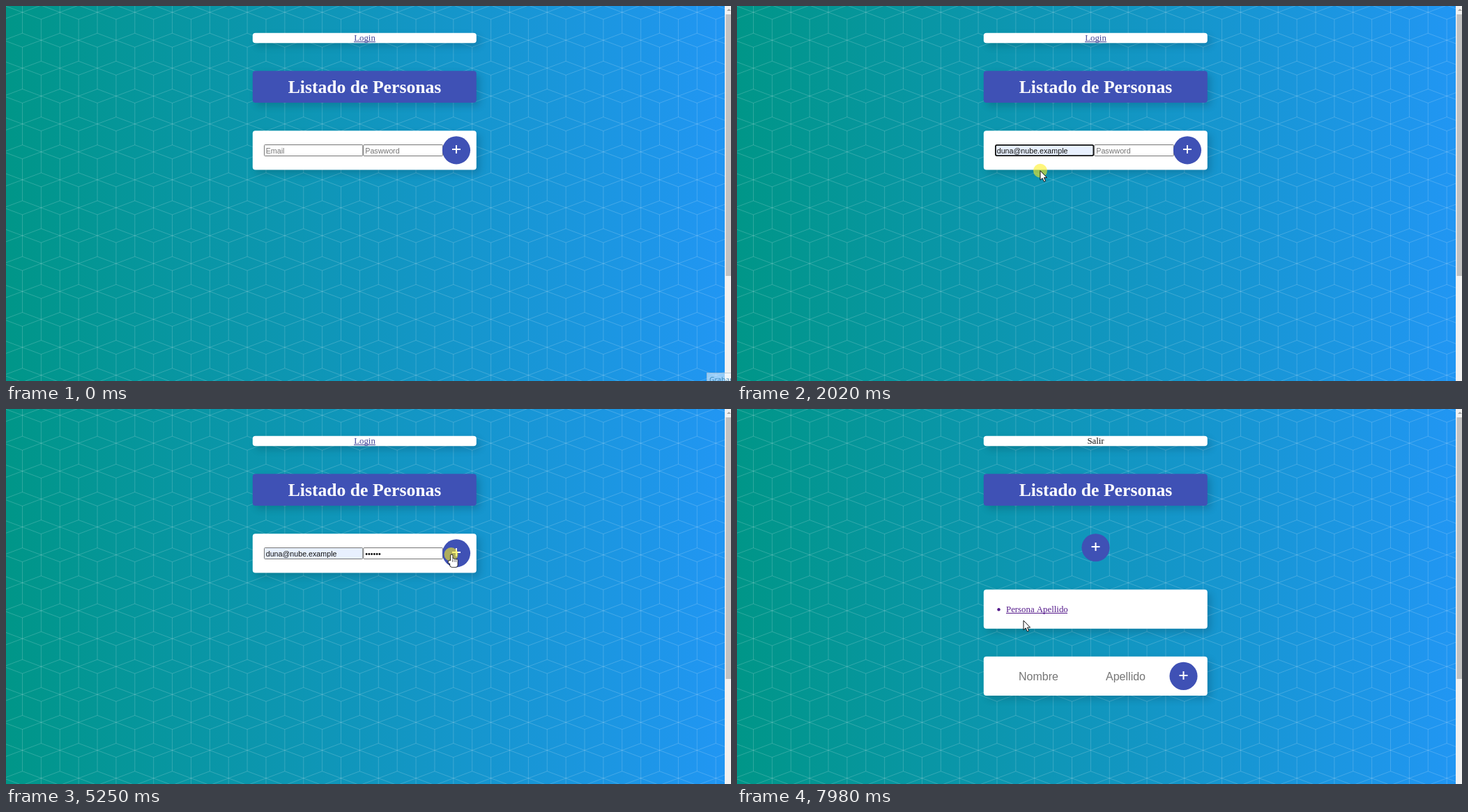
An HTML page with a canvas that plays this animation: 1040 by 539 pixels, repeating every 8000 ms.

```html
<!DOCTYPE html>
<html lang="es">
<head>
<meta charset="utf-8">
<title>Listado de Personas</title>
<style>
html, body { margin: 0; width: 100%; height: 100%; overflow: hidden; }
canvas { display: block; }
</style>
</head>
<body>
<canvas id="stage" width="1040" height="539"></canvas>
<script>
const W = 1040, H = 539, LOOP = 8000, PAGE_W = 1031;
const S = 0.8025; // page zoom
const INDIGO = '#3f51b5', GREY = '#757575', VISITED = '#551a8b', INK = '#111';
const SANS = '"Liberation Sans", Arial, sans-serif';
const SERIF = '"Liberation Serif", "Times New Roman", serif';
const UI = '"Open Sans", "Noto Sans", sans-serif';
const EMAIL = 'duna@nube.example';

// Moments in ms
const T = {
  focusEmail: 760, menu: 890, hover: 1420, pick: 1890, menuGone: 1960,
  focusPass: 2350, submit: 5250, home: 5600, openAdd: 7360, addForm: 7500
};
const CLICKS = [T.focusEmail, T.pick, T.focusPass, T.submit, T.openAdd];
const CLICK_MS = 160;

// Column layout: blocks separated by an equal gap
const GAP = 50 * S, LEFT = 353.8, MID = 514.5, ROUND = 25 * S;
const BAR = { y: 38.8, h: 18 * S };
const TITLE = below(BAR, 57 * S);
const FORM = below(TITLE, 70 * S);
const OPENER = below(TITLE, 2 * ROUND);
const LIST = below(OPENER, 70 * S);
const ADD = below(LIST, 70 * S);

const EMAIL_BOX = { x: 370, y: 199, w: 142.3, h: 17 };
const PASS_BOX = { x: 512.3, y: 199, w: 114.7, h: 17 };
const LINK_BOX = { x: 386, y: LIST.y + 21, w: 88, h: 13 };
const SUBMIT = { x: 646, y: middle(FORM) }, OPEN = { x: MID, y: middle(OPENER) };

// Pointer stops: when it leaves, and where it rests
const STOPS = [
  [70, 1036, 536], [1290, 433, 213], [2000, 434, 237], [2560, 533, 207],
  [4800, 535, 258.5], [5740, 638.5, 209], [6380, 472, 245], [7520, 510, 201],
  [LOOP, 411, 304]
];

const ARROW = new Path2D('M0 0V13.5L3.2 10.8 5.4 15.8 7.6 14.8 5.5 10H9.6Z');

const g = document.getElementById('stage').getContext('2d');

function below(block, h) {
  return { y: block.y + block.h + GAP, h };
}

function middle(block) {
  return block.y + block.h / 2;
}

function text(str, x, y, font, color, align = 'left') {
  g.font = font;
  g.fillStyle = color;
  g.textAlign = align;
  g.fillText(str, x, y);
}

function rect(x, y, w, h, color) {
  g.fillStyle = color;
  g.fillRect(x, y, w, h);
}

function roundRect(x, y, w, h, r) {
  g.beginPath();
  g.roundRect(x, y, w, h, r);
}

function disc(x, y, r, color) {
  g.fillStyle = color;
  g.beginPath();
  g.arc(x, y, r, 0, Math.PI * 2);
  g.fill();
}

function shadowed(x, y, w, h, r, color, offset, blur, alpha) {
  g.save();
  g.shadowColor = `rgba(0,0,0,${alpha})`;
  g.shadowOffsetX = g.shadowOffsetY = offset;
  g.shadowBlur = blur;
  g.fillStyle = color;
  roundRect(x, y, w, h, r);
  g.fill();
  g.restore();
}

function card({ y, h }, color = '#fff') {
  shadowed(LEFT, y, 400 * S, h, 5 * S, color, 5, 11, 0.16);
}

function plusButton({ x, y }) {
  disc(x, y, ROUND, INDIGO);
  const cy = Math.round(y) - 1;
  rect(x - 6, cy - 1, 12, 2, '#fff');
  rect(x - 1, cy - 6, 2, 12, '#fff');
}

function field({ x, y, w, h }, fill, focused) {
  const line = focused ? 1.8 : 1, inset = line / 2;
  roundRect(x + inset, y + inset, w - line, h - line, focused ? 2 : 1);
  g.fillStyle = fill;
  g.fill();
  g.strokeStyle = focused ? '#101010' : '#767676';
  g.lineWidth = line;
  g.stroke();
}

// Tumbling-block lattice over a horizontal gradient
function makeBackdrop() {
  const c = document.createElement('canvas');
  c.width = W;
  c.height = H;
  const b = c.getContext('2d');
  const grad = b.createLinearGradient(0, 0, PAGE_W, 0);
  grad.addColorStop(0, '#009688');
  grad.addColorStop(1, '#2196f3');
  b.fillStyle = grad;
  b.fillRect(0, 0, W, H);

  const dx = 33.5 * S, dy = 12.5 * S, row = 50 * S;
  b.strokeStyle = 'rgba(255,255,255,.2)';
  b.lineWidth = 0.9;
  b.beginPath();
  for (let r = -3; r < 14; r++) {
    const y = 49.2 + r * row;
    for (let k = -2; k < 40; k++) {
      if ((r + k) % 2) continue;
      const x = 23.5 + k * dx;
      b.moveTo(x - dx, y);
      b.lineTo(x, y - dy);
      b.lineTo(x + dx, y);
      b.lineTo(x, y + dy);
      b.lineTo(x - dx, y);
      b.moveTo(x, y + dy);
      b.lineTo(x, y + 2 * row - dy);
    }
  }
  b.stroke();

  b.fillStyle = '#f1f1f1';
  b.fillRect(PAGE_W, 0, W - PAGE_W, H);
  b.fillStyle = '#c1c1c1';
  b.fillRect(1032.5, 12, 7.5, 376);
  b.fillStyle = '#a3a3a3';
  b.fill(new Path2D('M1034 7l3-3 3 3z'));
  return c;
}
const backdrop = makeBackdrop();

function header(home) {
  const font = 16 * S + 'px ' + SERIF, link = '#44489a';
  card(BAR);
  text(home ? 'Salir' : 'Login', MID, 50, font, home ? INK : link, 'center');
  if (!home) rect(499, 51, 31, 1, link);
  card(TITLE, INDIGO);
  text('Listado de Personas', MID, 125, `bold ${32 * S}px ` + SERIF, '#fff', 'center');
}

// Each key takes a little longer than the one before
function typedCount(t) {
  let n = 0;
  while (n < 6 && t >= 3025 + 235 * n + 16 * n * n) n++;
  return n;
}

function loginForm(t) {
  const font = 13.33 * S + 'px ' + SANS, base = 211.5;
  const filled = t >= T.hover;
  const emailFocus = t >= T.focusEmail && t < T.focusPass;
  const passFocus = t >= T.focusPass && t < T.submit;
  const typed = typedCount(t);

  card(FORM);
  field(EMAIL_BOX, filled ? '#e8f0fe' : '#fff', emailFocus);
  field(PASS_BOX, '#fff', passFocus);
  text(filled ? EMAIL : 'Email', 372.7, base, font, filled ? INK : GREY);
  text(typed ? '•'.repeat(typed) : 'Paswword', 515.3, base, font, typed ? INK : GREY);

  if (emailFocus && !filled) rect(373, 202, 1, 11.5, INK);
  if (passFocus) rect(515 + typed * 3.8, 202, 1, 11.5, INK);
  plusButton(SUBMIT);
  if (t >= T.menu && t < T.menuGone) suggestions(filled);
}

function suggestions(hovered) {
  const x = 369.3, w = 154.2;
  shadowed(x, 217, w, 42, 2, '#292a2d', 1, 4, 0.35);
  if (hovered) rect(x, 222, w, 33, '#45464a');
  text(EMAIL, 377.5, 242, '10.1px ' + UI, '#f4f5f6');
}

function homePage(t) {
  plusButton(OPEN);
  card(LIST);
  disc(375.5, 288.3, 2.2, VISITED);
  text('Persona Apellido', LINK_BOX.x, 291.8, 16 * S + 'px ' + SERIF, VISITED);
  rect(LINK_BOX.x, 293, LINK_BOX.w, 1, VISITED);
  if (t < T.addForm) return;
  card(ADD);
  text('Nombre', 432.5, 389.7, 20 * S + 'px ' + SANS, GREY, 'center');
  text('Apellido', 557.5, 389.7, 20 * S + 'px ' + SANS, GREY, 'center');
  plusButton({ x: 640.5, y: middle(ADD) });
}

function tooltip(t) {
  const alpha = 1 - Math.max(0, t - 70) / 210;
  if (alpha <= 0) return;
  g.save();
  g.globalAlpha = alpha;
  rect(1005, 527, 35, 12, 'rgba(245,250,255,.55)');
  g.strokeStyle = 'rgba(150,175,195,.6)';
  g.lineWidth = 1;
  g.strokeRect(1005.5, 527.5, 40, 20);
  text('Grabar', 1009, 541, '10.2px ' + UI, 'rgba(40,125,175,.85)');
  g.restore();
}

// Travel time grows with distance, eased at both ends
function pointerAt(t) {
  const i = Math.max(1, STOPS.findIndex(s => s[0] > t));
  const [leave, x0, y0] = STOPS[i - 1], [, x1, y1] = STOPS[i];
  const travel = Math.min(620, 150 + 2 * Math.hypot(x1 - x0, y1 - y0));
  const u = Math.min(1, (t - leave) / travel), e = u * u * (3 - 2 * u);
  return [x0 + (x1 - x0) * e, y0 + (y1 - y0) * e];
}

function pointerShape(t, x, y) {
  const inBox = b => x >= b.x && x <= b.x + b.w && y >= b.y && y <= b.y + b.h;
  const onDisc = c => Math.hypot(x - c.x, y - c.y) < ROUND;
  if (t >= T.home) return onDisc(OPEN) || inBox(LINK_BOX) ? hand : arrow;
  if (onDisc(SUBMIT)) return hand;
  return inBox(EMAIL_BOX) || inBox(PASS_BOX) ? beam : arrow;
}

function arrow() {
  g.fillStyle = '#fff';
  g.fill(ARROW);
  g.strokeStyle = INK;
  g.lineWidth = 1;
  g.stroke(ARROW);
}

function beam() {
  rect(-0.5, -5.5, 1, 12, '#222');
  for (const y of [-6, 6]) rect(-2.5, y, 5, 1, '#222');
}

function hand() {
  const shape = new Path2D();
  shape.roundRect(-0.4, 0.4, 2.4, 12, 1.2);
  for (let i = 1; i < 4; i++) shape.roundRect(-0.4 + 2.4 * i, 5.5 + i * 0.5, 2.4, 6, 1.2);
  shape.roundRect(-4, 9, 5, 4, 2);
  shape.roundRect(-1.4, 9, 10.6, 9, 3);
  g.strokeStyle = INK;
  g.lineWidth = 1.6;
  g.stroke(shape);
  g.fillStyle = '#fff';
  g.fill(shape);
  for (let i = 1; i < 4; i++) rect(-0.6 + 2.4 * i, 7, 0.6, 4, INK);
}

function pointer(t) {
  if (t < STOPS[0][0]) return;
  const [x, y] = pointerAt(t);
  if (CLICKS.some(c => t >= c && t < c + CLICK_MS)) disc(x, y, 10, 'rgba(255,240,30,.58)');
  g.save();
  g.translate(x, y);
  pointerShape(t, x, y)();
  g.restore();
}

function draw(t) {
  const home = t >= T.home;
  g.drawImage(backdrop, 0, 0);
  header(home);
  if (home) homePage(t);
  else loginForm(t);
  tooltip(t);
  pointer(t);
}

const start = performance.now();
function tick() {
  draw((performance.now() - start) % LOOP);
  requestAnimationFrame(tick);
}
tick();
</script>
</body>
</html>
```
